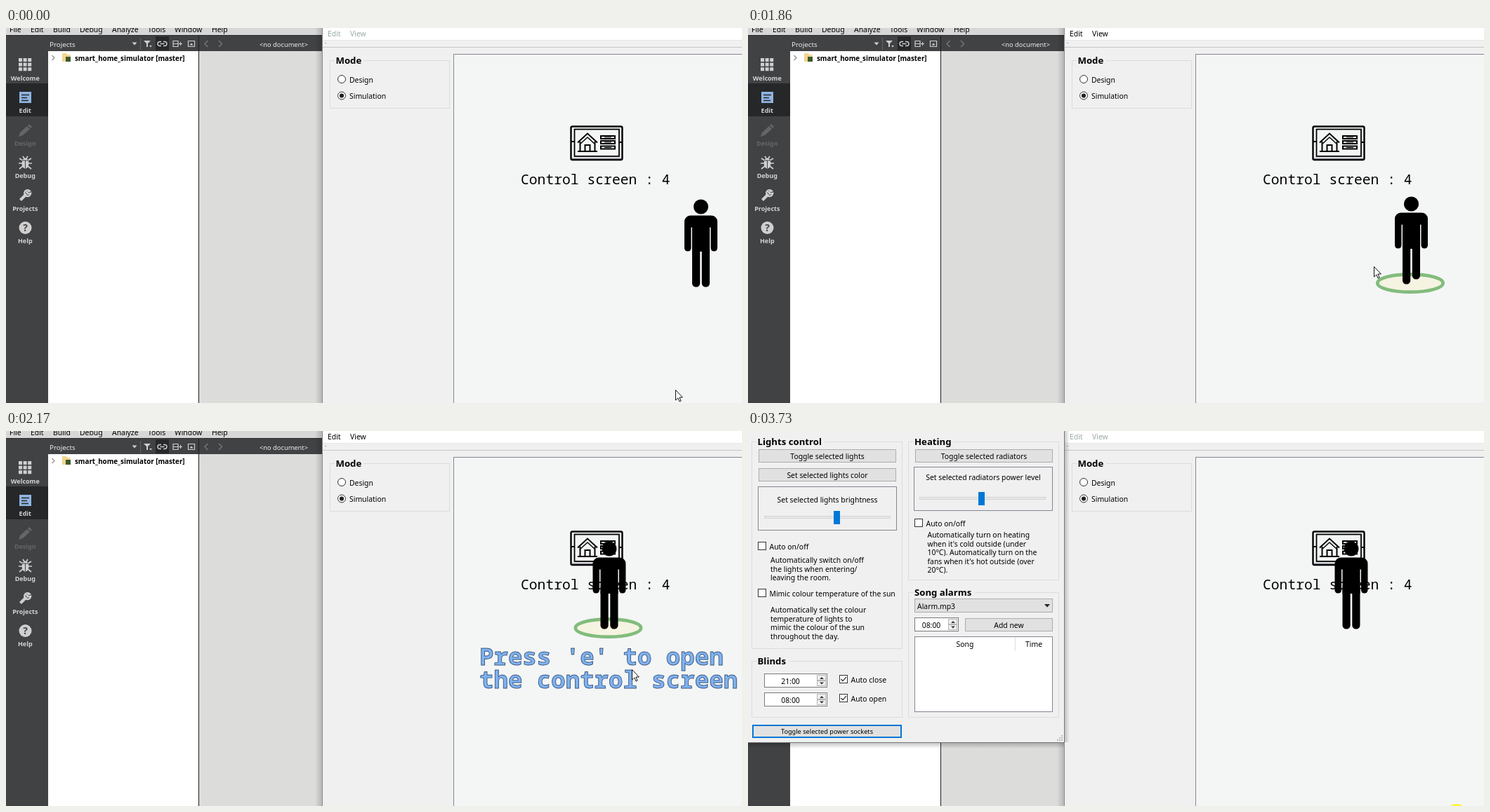
Recreate the animation shown at these times as an HTML page. Size 1048 by 535 pixels, loop 3.86 s.

```html
<!DOCTYPE html>
<html lang="en">
<head>
<meta charset="utf-8">
<title>Smart home simulator</title>
<style>
html, body { margin: 0; width: 100%; height: 100%; overflow: hidden; background: #f0f0f0; }
svg { display: block; width: 1048px; height: 535px; font: 10.4px "Noto Sans", "Open Sans", sans-serif; }
text { white-space: pre; }
.mono { font-family: "Noto Sans Mono", "DejaVu Sans Mono", monospace; }
</style>
</head>
<body>
<svg id="stage" viewBox="0 0 1048 535">
  <defs>
    <linearGradient id="sideShade"><stop stop-color="#000" stop-opacity="0"/><stop offset="1" stop-color="#000" stop-opacity=".17"/></linearGradient>
    <linearGradient id="rightShade"><stop stop-color="#000" stop-opacity=".2"/><stop offset="1" stop-color="#000" stop-opacity="0"/></linearGradient>
    <linearGradient id="lowShade" x2="0" y2="1"><stop stop-color="#000" stop-opacity=".25"/><stop offset="1" stop-color="#000" stop-opacity="0"/></linearGradient>
  </defs>
  <g id="ide"></g>
  <g id="simulator"></g>
  <g id="device" fill="none" stroke="#000" stroke-width="2">
    <rect x="804.5" y="140.5" width="73" height="47.5" rx="2" stroke-width="2.4"/>
    <rect x="809.5" y="144.5" width="63.5" height="38.5" stroke-width="1.8"/>
    <path d="M806 186H876" stroke="#77758a" stroke-width="1"/>
    <path d="M805 162h4M873 163h5"/>
    <path d="M814 163.5 828 150.5 842 163.5M817.5 162V176H838.5V162M824.5 176V167H831.5V176M814 176H842"/>
    <path d="M817 166 828 156 839 166" stroke-width="1.4"/>
    <path d="M847 154H867V158H847ZM847 161H867V165H847ZM847 168.5H867V172.5H847Z"/>
    <path d="M852 156h10M852 163h10M852 170.5h10" stroke-width="1.2"/>
    <text class="mono" x="733" y="222.5" font-size="19.7" fill="#000" stroke="none">Control screen : 4</text>
  </g>
  <g id="person">
    <ellipse id="ring" cx="988" cy="368" rx="46.7" ry="12.6" fill="#f5f3e1" stroke="#82bc7d" stroke-width="4.6"/>
    <circle cx="989.5" cy="255" r="10.5"/>
    <rect x="966" y="267.5" width="47" height="17" rx="9"/>
    <rect x="966" y="274" width="9.5" height="44.5" rx="4.5"/>
    <rect x="1003.5" y="274" width="9.5" height="44.5" rx="4.5"/>
    <path d="M977 270h25v49h-25z"/>
    <rect id="leftLeg" x="977" y="305" width="11.2" rx="5.2"/>
    <rect id="rightLeg" x="990.8" y="305" width="11.2" rx="5.2"/>
    <g id="hint" class="mono" font-size="34.1" font-weight="700" fill="#7fb2f0" stroke="#39547c" stroke-width=".9">
      <text x="804.5" y="421">Press 'e' to open</text>
      <text x="804.5" y="454">the control screen</text>
    </g>
  </g>
  <g id="dialog"></g>
  <circle id="click" r="15" fill="#fdf53c"/>
  <path id="cursor" d="M.5.5V15L3.8 11.9 6.1 17 8.2 16 5.9 11H10.4Z" fill="#fff" stroke="#111"/>
</svg>
<script>
const LOOP = 3860;
const $ = id => document.getElementById(id);

const rect = (x, y, w, h, fill, stroke = 'none', extra = '') =>
  `<rect x="${x}" y="${y}" width="${w}" height="${h}" fill="${fill}" stroke="${stroke}" ${extra}/>`;
const line = (d, stroke, width = 1) => `<path d="${d}" fill="none" stroke="${stroke}" stroke-width="${width}"/>`;
const shape = (d, fill) => `<path d="${d}" fill="${fill}"/>`;
const label = (x, y, text, extra = '') =>
  `<text x="${x}" y="${y}" ${extra}>${text.replace(/</g, '&lt;')}</text>`;
const centered = (x, y, text, extra = '') => label(x, y, text, 'text-anchor="middle" ' + extra);
const lines = (x, y, rows) => rows.map((row, i) => label(x, y + i * 12.5, row)).join('');

const group = (x, y, w, h, title, titleWidth) =>
  rect(Math.floor(x) + .5, y + .5, w, h, 'none', '#dcdcdc') +
  rect(x + 7, y - 4, titleWidth + 4, 9, '#f0f0f0') +
  label(x + 8.5, y + 5, title, 'font-size="13.2" font-weight="700"');
const button = (x, y, w, text) =>
  rect(x + .5, y + .5, w - 1, 18, '#e1e1e1', '#adadad') + centered(x + w / 2, y + 14, text);
const checkbox = (x, y, text, checked) =>
  rect(x + .5, y + .5, 11, 11, '#fff', '#333') +
  (checked ? line(`M${x + 2.5} ${y + 6}l2.5 2.7 4.8-5.5`, '#222', 1.2) : '') +
  label(x + 16.5, y + 10.5, text);
const slider = (x, y, handle) =>
  rect(x + .5, y - 1.5, 179, 3, '#e7eaea', '#d2d2d2') + rect(handle, y - 9, 9, 19, '#0078d7');
const spinner = (x, y, w, text) => {
  const b = x + w - 15;
  return rect(x + .5, y + .5, w - 1, 19, '#fff', '#7a7a7a') +
    centered(x + (w - 15) / 2, y + 14.5, text) +
    rect(b + .5, y + 2.5, 12, 7, '#f0f0f0', '#b4b4b4') +
    rect(b + .5, y + 10.5, 12, 7, '#f0f0f0', '#b4b4b4') +
    shape(`M${b + 4} ${y + 8}h6l-3-3zM${b + 4} ${y + 12.5}h6l-3 3z`, '#333');
};

function buildIde() {
  const light = '#cfcfcf';
  const menus = [[5, 'File'], [35, 'Edit'], [67, 'Build'], [105, 'Debug'], [151, 'Analyze'],
    [202, 'Tools'], [240, 'Window'], [293, 'Help']];
  const modes = ['Welcome', 'Edit', 'Design', 'Debug', 'Projects', 'Help'];
  let out = rect(0, 0, 451, 535, '#dcdcdb') + rect(0, 0, 451, 10, '#d7d7d7') +
    rect(0, 10, 451, 23, '#404244') + rect(0, 10, 451, 1, '#2b2c2d') +
    rect(0, 33, 60, 502, '#404244') + rect(0, 79, 60, 47, '#262728') +
    rect(60, 33, 214, 502, '#fff') + rect(274, 11, 1, 524, '#1f2021');
  menus.forEach(([x, name]) => out += label(x, 5.5, name));
  modes.forEach((name, i) => out += centered(27.3, 75 + i * 46.4, name,
    `font-size="9" font-weight="700" fill="${i === 2 ? '#656668' : '#d3d3d3'}"`));

  for (let i = 0; i < 9; i++) out += rect(18 + i % 3 * 6.6, 43 + (i / 3 | 0) * 6.6, 5, 5, light);
  out += rect(19, 91, 17, 16, '#8fb4e0') + line('M22 95.5h11M22 99.5h8M22 103.5h10', '#262728', 1.5);
  out += shape('M18 155l2-6 10-9 4 4-10 9zM31 139l2-2 4 4-2 2z', '#646567');
  out += `<ellipse cx="27.5" cy="193" rx="5" ry="7.5" fill="${light}"/>` +
    line('M19 186l5 3M36 186l-5 3M18 193h19M19 201l5-4M36 201l-5-4M24 183l2 3M31 183l-2 3', light, 1.7) +
    line('M27.5 189v11M23 189h9', '#404244');
  out += line('M20.5 245.5l8.5-8.5', light, 4) +
    line('M34 232.5a4.5 4.5 0 1 0 1.2 3.2l-4 1-1.8-2.4z', light, 2.3);
  out += `<circle cx="27.5" cy="285" r="9" fill="${light}"/>` +
    centered(27.5, 290, '?', 'font-size="14" font-weight="700" fill="#404244"');

  out += label(62, 27, 'Projects', 'font-size="9.8" fill="#eee"') +
    label(361, 27, '<no document>', 'font-size="9.3" fill="#eee"') +
    rect(213, 12, 19, 20, '#262829') + rect(191, 14, 1, 17, '#666') +
    shape('M179.5 20.5h7l-3.5 4zM196 18h10l-4 4v5h-2v-5zM204 25h4l-2 2.5z', light) +
    line('M221 19.5h-2a3 3 0 0 0 0 6h2M224 19.5h2a3 3 0 0 1 0 6h-2M219.5 22.5h6', light, 1.4) +
    line('M238 18.5h7v8h-7zM238 22.5h7M246 22.5h5M248.5 20v5M259.5 18.5h9v8h-9z', light, 1.2) +
    shape('M261.5 24.5h5l-2.5-3z', light) +
    line('M287.5 18l-4.5 4.5 4.5 4.5M303 18l4.5 4.5-4.5 4.5', '#77797b', 1.4);

  out += line('M65.5 39l3.5 3.5-3.5 3.5', '#888', 1.1) +
    shape('M80 36h6l1 2h4.5v10H80z', '#f5d58f') + rect(85, 41, 7, 7, '#3c5a2c') +
    label(98, 46.5, 'smart_home_simulator [master]', 'font-size="9.8" font-weight="700"');
  $('ide').innerHTML = out;
}

function buildSimulator() {
  const radio = (y, text, on) => `<circle cx="478" cy="${y}" r="5.5" fill="#fff" stroke="#333"/>` +
    (on ? `<circle cx="478" cy="${y}" r="3.1" fill="#222"/>` : '') + label(489, y + 4.5, text);
  $('simulator').innerHTML =
    rect(440, 0, 10, 535, 'url(#sideShade)') + rect(450, 0, 598, 535, '#f0f0f0') +
    rect(450, 0, 598, 17, '#fff') + rect(451, 17, 597, 1, '#e6e6e6') + rect(451, 27, 597, 1, '#c6c6c6') +
    rect(450, 0, 1, 535, '#8b8b8b') + rect(454, 21, 2, 1, '#a0a0a0') +
    `<g id="menu">${label(458, 12, 'Edit')}${label(490, 12, 'View')}</g>` +
    group(461, 46, 170, 68, 'Mode', 37) +
    radio(73, 'Design') + radio(96.5, 'Simulation', true) +
    rect(637.5, 37.5, 420, 510, '#f4f6f5', '#828790');
}

function buildDialog() {
  let grip = '';
  for (let r = 0; r < 3; r++) for (let c = 0; c <= r; c++)
    grip += rect(446 - c * 3, 434 + r * 3, 2, 2, '#bcbcbc');
  $('dialog').innerHTML =
    rect(0, 444, 450, 9, 'url(#lowShade)') + rect(451, 0, 7, 444, 'url(#rightShade)') +
    rect(0, 0, 450, 444, '#f0f0f0') + rect(450, 0, 1, 444, '#777') + rect(0, 444, 451, 1, '#777') +

    group(5, 15, 214, 295, 'Lights control', 93) +
    button(15, 26, 196, 'Toggle selected lights') + button(15, 53, 196, 'Set selected lights color') +
    rect(14.5, 79.5, 197, 62, 'none', '#828790') +
    centered(113, 102, 'Set selected lights brightness') + slider(23, 123, 122) +
    checkbox(14, 158, 'Auto on/off') +
    lines(32, 188, ['Automatically switch on/off', 'the lights when entering/', 'leaving the room.']) +
    checkbox(14, 225, 'Mimic colour temperature of the sun') +
    lines(32, 259, ['Automatically set the colour', 'temperature of lights to',
      'mimic the colour of the sun', 'throughout the day.']) +

    group(228.5, 15, 214, 197, 'Heating', 53) + button(238, 26, 196, 'Toggle selected radiators') +
    rect(236.5, 51.5, 197, 62, 'none', '#828790') +
    centered(335, 70, 'Set selected radiators power level') + slider(244, 96, 328) +
    checkbox(237, 125, 'Auto on/off') +
    lines(255.5, 152, ['Automatically turn on heating', "when it's cold outside (under",
      '10°C). Automatically turn on the', "fans when it's hot outside (over", '20°C).']) +

    group(228.5, 230, 214, 178, 'Song alarms', 84) +
    rect(237.5, 239.5, 196, 19, '#e1e1e1', '#adadad') + label(241, 254, 'Alarm.mp3') +
    shape('M422 247h8l-4 4.5z', '#222') +
    spinner(237, 266, 63, '08:00') + button(309, 267, 125, 'Add new') +
    rect(237.5, 293.5, 196, 107, '#fff', '#828790') + rect(380, 294, 1, 20, '#dedede') +
    centered(309, 308, 'Song') + centered(407, 308, 'Time') +

    group(5, 328, 214, 80, 'Blinds', 42) +
    spinner(23, 346, 90, '21:00') + spinner(23, 373, 90, '08:00') +
    checkbox(130, 348, 'Auto close', true) + checkbox(130, 375, 'Auto open', true) +
    rect(7, 420, 211, 17, '#e1e1e1', '#0078d7', 'stroke-width="2"') +
    centered(112.5, 432, 'Toggle selected power sockets', 'font-size="9.2"') + grip;
}

// Each entry: start time, then the values held until the next entry.
const walk = [
  [0, 0, 0, 0, 0], [1720, -15, 0, 0, 3], [1790, -30, 0, 0, 6], [1860, -45, -4, 0, 7],
  [1910, -66, -24, 3, 0], [1980, -86, -45, 7, 0], [2050, -101, -59, 5, 0],
  [2110, -116, -73, 2, 0], [2170, -130.5, -87, 0, 0]
];
const pointer = [
  [0, 953, 516], [50, 936, 490], [110, 908, 446], [170, 892, 420],
  [860, 892, 404], [920, 892, 378], [980, 891, 354], [1040, 891, 340],
  [3280, 901, 357], [3345, 928, 405], [3410, 964, 464], [3475, 994, 514], [3540, 1009, 547]
];
const held = (track, t) => track.filter(step => step[0] <= t).pop();
const during = (t, from, to) => t >= from && t < to;
const show = (id, on) => $(id).setAttribute('display', on ? 'inline' : 'none');
const move = (id, x, y) => $(id).setAttribute('transform', `translate(${x} ${y})`);

function draw(t) {
  const [, dx, dy, leftLift, rightLift] = held(walk, t);
  const [, px, py] = held(pointer, t);
  const focused = during(t, 1100, 2470);
  move('person', dx, dy);
  $('leftLeg').setAttribute('height', 64.5 - leftLift);
  $('rightLeg').setAttribute('height', 64.5 - rightLift);
  move('device', 0, t < 2050 ? 0 : t < 2110 ? 1 : t < 2170 ? 2 : 3);
  show('ring', focused);
  show('hint', during(t, 2050, 2470));
  show('dialog', t >= 2470);
  $('menu').setAttribute('fill', focused ? '#000' : '#98aaa1');
  move('cursor', px, py);
  move('click', px, py);
  show('click', during(t, 1100, 1220) || t >= 3730);
}

buildIde();
buildSimulator();
buildDialog();
const start = performance.now();
function tick() {
  draw((performance.now() - start) % LOOP);
  requestAnimationFrame(tick);
}
tick();
</script>
</body>
</html>
```
